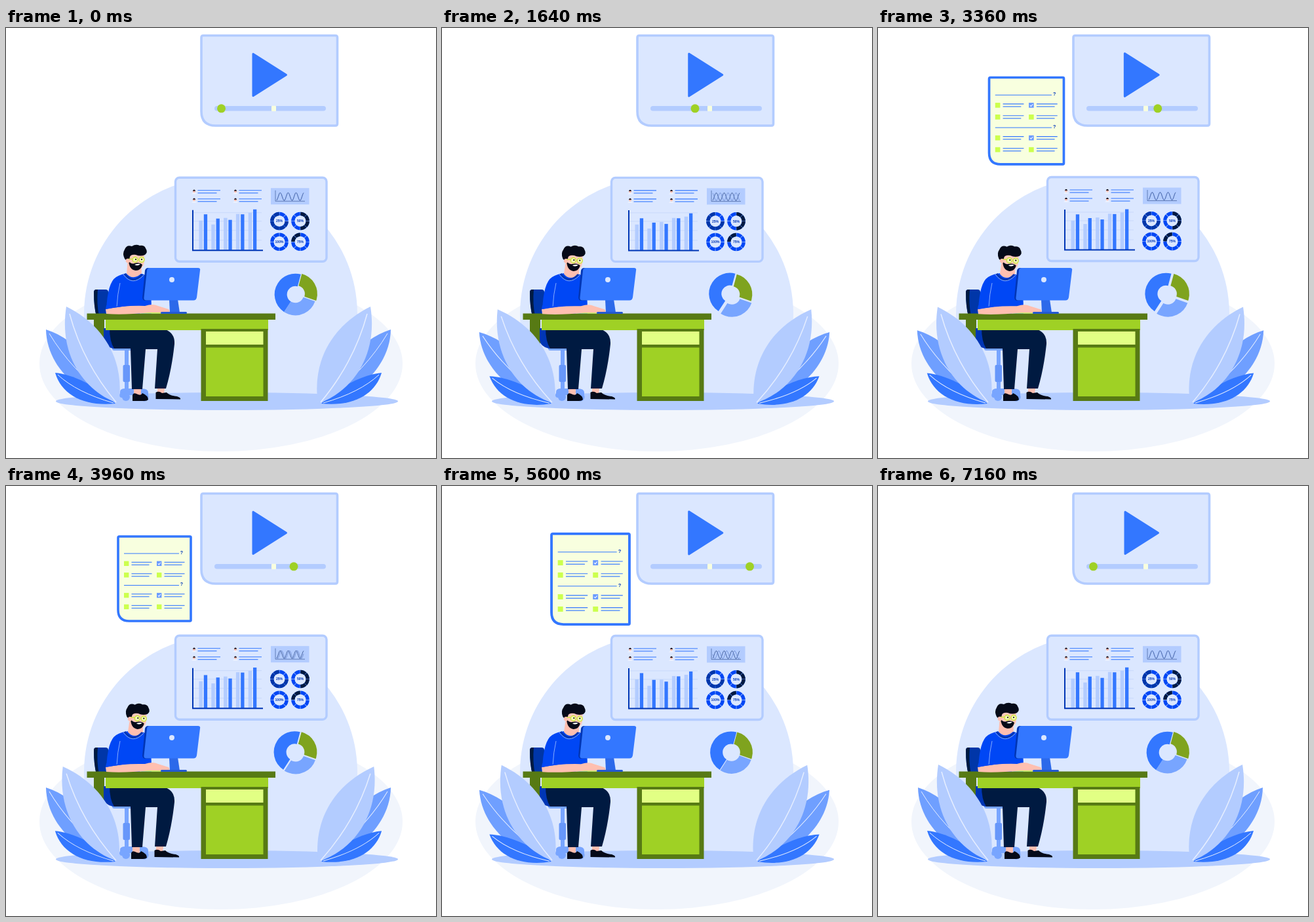
An HTML page that plays this animation: 656 px wide and 656 px high, repeating every 7.2 s.

```html
<!DOCTYPE html>
<html lang="en">
<head>
<meta charset="utf-8">
<title>Working at a desk</title>
<style>
html, body { margin: 0; width: 100%; height: 100%; overflow: hidden; background: #fff; }
svg { display: block; width: 100vw; height: 100vh; }
text { font-family: "Liberation Sans", Inter, sans-serif; font-weight: bold; text-anchor: middle; fill: #0036b5; }
.rib { fill: none; stroke: #e6eeff; }
</style>
</head>
<body>
<svg viewBox="0 0 656 656">
  <defs>
    <g id="plant">
      <g class="side">
        <path d="M165 573C110 560 62 515 61 460C100 472 140 510 165 573Z" fill="#6f9fff"/>
        <path d="M66 466Q98 520 160 568" class="rib"/>
      </g>
      <g class="low">
        <path d="M167 573C120 578 85 560 75 526C100 528 140 546 167 573Z" fill="#3377ff"/>
        <path d="M79 529Q108 556 164 572" class="rib"/>
      </g>
      <g class="big">
        <path d="M172 573C120 555 80 500 92 425C147 452 182 505 172 573Z" fill="#b3ccff"/>
        <path d="M97 436Q117 510 168 571" class="rib" stroke-width="1.5"/>
      </g>
    </g>
  </defs>

  <!-- backdrop -->
  <ellipse cx="328" cy="512" rx="277" ry="134" fill="#f1f5fc"/>
  <path d="M158 565A208.5 208.5 0 1 1 497 565Z" fill="#dbe7ff" transform="translate(0 -7)"/>
  <ellipse cx="337" cy="569.5" rx="261" ry="13.5" fill="#b3ccff"/>

  <!-- video card -->
  <path d="M301 11.5H502.5Q505.5 11.5 505.5 14.5V146Q505.5 149 502.5 149H320Q298 149 298 127V14.5Q298 11.5 301 11.5Z" fill="#dbe7ff" stroke="#b3ccff" stroke-width="3.6"/>
  <path id="play" d="M377 39.5L427.5 71.5L377 103.5Z" fill="#3377ff" stroke="#3377ff" stroke-width="3" stroke-linejoin="round"/>
  <rect x="318" y="119" width="170" height="7.6" rx="3.8" fill="#b3ccff"/>
  <rect x="405" y="118.8" width="7" height="8.2" rx="1" fill="#f8ffdf"/>
  <circle id="knob" cy="122.8" r="6.5" fill="#9fd125"/>

  <!-- quiz sheet -->
  <g id="sheet">
    <path d="M173 77H280.5Q282 77 282 78.5V204.5Q282 206 280.5 206H188Q171 206 171 189V79Q171 77 173 77Z" fill="#f8ffdf" stroke="#3377ff" stroke-width="3.6"/>
    <g id="quiz"></g>
  </g>

  <!-- dashboard -->
  <g id="panel">
    <rect x="258.5" y="228.5" width="230.5" height="128" rx="6" fill="#dbe7ff" stroke="#b3ccff" stroke-width="3.4"/>
    <g id="people"></g>
    <path d="M286 282H390M286 295H390M286 309H390M286 324H390" stroke="#c3d5fa" stroke-width=".8"/>
    <g id="bars"></g>
    <path d="M285 278V339.5H392" fill="none" stroke="#0036b5" stroke-width="2"/>
    <rect x="404" y="244.5" width="58.5" height="25" fill="#b3ccff"/>
    <g fill="none" stroke="#3d5a96" stroke-width=".9">
      <path d="M411 248V264.5H456" stroke-width=".7"/>
      <path id="waveA"/><path id="waveB" stroke="#5f7fc4" stroke-width=".7"/>
    </g>
    <g id="rings"></g>
  </g>

  <!-- pie -->
  <g id="pie" fill="none" stroke-width="19"></g>

  <!-- chair -->
  <path d="M134 403Q134 399 138 399H152Q156 399 156 403V440H138Q134 425 134 403Z" fill="#0036a8"/>
  <path d="M134 403Q134 399 138 399H140Q138 420 142 440H138Q134 425 134 403Z" fill="#001a41"/>
  <rect x="134" y="444" width="16" height="96" fill="#577a14"/>
  <g fill="#78a5ff">
    <rect x="162" y="485" width="42" height="7" rx="3"/>
    <rect x="181" y="490" width="6" height="62"/>
    <rect x="178.5" y="514" width="10.5" height="26" rx="2" fill="#6797fa"/>
    <path d="M174 555Q174 550 182 550H206Q217 550 217 556V560H174Z"/>
    <circle cx="183" cy="563" r="6"/><circle cx="211" cy="563" r="6.5"/><circle cx="177" cy="560" r="4"/>
  </g>

  <!-- lower body -->
  <g id="feet">
    <path d="M195 545H206V561H195ZM231 544H243L241 558H231Z" fill="#ffbfb0"/>
    <path d="M193 569V560Q194 556 199 558Q206 562 208 557Q217 561 217 567Q215 569 211 569Z" fill="#050a18"/>
    <path d="M228.5 566V556Q233 553 238 557L245 556Q250 561 261 562Q267 564 266 566.5Z" fill="#050a18"/>
  </g>
  <path d="M149 458H170V489H163Q150 486 149 476Z" fill="#0036b5"/>
  <path d="M165 489Q158 478 158 458H236Q258 462 257 482Q253 520 244 550H227L231 490H213L208 551H192L190 489Z" fill="#001a41"/>

  <!-- desk -->
  <g fill="#577a14">
    <rect x="152" y="444" width="248" height="17" fill="#9fd125"/>
    <rect x="297.5" y="459" width="102" height="110"/>
    <rect x="305" y="463" width="87.5" height="20" fill="#e2ff84"/>
    <rect x="305" y="487.5" width="87.5" height="74.5" fill="#9fd125"/>
  </g>
  <use href="#plant"/>
  <use href="#plant" transform="matrix(-1 0 0 1 648 0)"/>
  <rect x="123.5" y="435.5" width="287.5" height="9.5" fill="#577a14"/>

  <!-- upper body -->
  <path d="M153 430Q155 388 168 380Q176 375 187 374H203Q216 376 221 386L222 435.5H152Z" fill="#0047f5"/>
  <g id="head">
    <path d="M186 352L184 375Q194 386 207 374L206 356Z" fill="#ffbfb0"/>
    <path d="M185 344Q197 336 211 346L211 358Q210 368 199 368Q185 366 185 344Z" fill="#ffc9bb"/>
    <path d="M187 355Q191 361 196 359Q204 357 208 361Q206 370 198 370Q188 369 187 355Z" fill="#050a18"/>
    <path d="M196 361Q201 364 205 360Q202 359 196 361Z" fill="#fff"/>
    <path d="M181 352Q177 344 181 338Q184 330 192 333Q198 329 204 332Q211 331 213 336Q217 342 212 346Q205 349 198 346Q191 345 189 349Q188 355 186 357Q183 354 181 352Z" fill="#050a18"/>
    <circle cx="186" cy="355" r="3.3" fill="#ffbfb0"/>
    <g fill="#f2f3b4" stroke="#cde53c" stroke-width="1.4">
      <circle cx="197" cy="353.5" r="4"/><circle cx="207" cy="353.5" r="4"/>
      <path d="M187 352.5H193"/>
    </g>
    <circle cx="198" cy="353" r="1"/><circle cx="207" cy="353" r="1"/>
  </g>
  <path d="M181 375Q194 392 208 376" fill="none" stroke="#0036b5" stroke-width="3"/>
  <path d="M179 376Q193 395 210 377M174 389Q170 406 169 426" fill="none" stroke="#a9c4ff" stroke-width=".8"/>
  <rect x="204" y="432.5" width="32" height="3" fill="#cdf65a"/>
  <path id="arm" d="M152 429Q180 423 212 424Q224 420 232 424L248 429Q252 433 246 434H218Q180 438 153 436Z" fill="#ffbfb0"/>
  <path d="M153 423Q165 427 178 423L210 412L222 420Q200 421 152 429Z" fill="#0047f5"/>

  <!-- monitor -->
  <path d="M249 414H262L265 434H250Z" fill="#2c69ea"/>
  <rect x="236" y="433" width="40" height="3" rx="1.5" fill="#2459d0"/>
  <path d="M217 366Q213 366 212 370L208 411Q208 416 213 416H220V366Z" fill="#0036b5"/>
  <path d="M219 366H293Q297 366 296 370L291 411Q290 415.5 286 415.5H214Q210 415.5 210.5 411L215 370Q215.5 366 219 366Z" fill="#3377ff"/>
  <circle cx="253" cy="384" r="4" fill="#dbe7ff"/>
</svg>
<script>
const $ = id => document.getElementById(id);
const LOOP = 7200, REST = 7120;
const BASE = 339;

// swings 0 -> 1 -> 0 over one period
const swing = (t, period) => (1 - Math.cos(2 * Math.PI * t / period)) / 2;
const smooth = p => p * p * (3 - 2 * p);
const clamp = p => Math.max(0, Math.min(1, p));

// value at t between [time, value] keys
function track(keys, t, ease = p => p) {
  let value = keys[0][1];
  for (let i = 1; i < keys.length; i++) {
    const [t0, a] = keys[i - 1], [t1, b] = keys[i];
    if (t >= t0) value = a + (b - a) * ease(clamp((t - t0) / (t1 - t0)));
  }
  return value;
}

const line = (x, y, w, color, width) =>
  `<path d="M${x} ${y}h${w}" stroke="${color}" stroke-width="${width}"/>`;

// ring section: degrees clockwise from the right
const arc = (x, y, r, from, dash, attrs) =>
  `<circle cx="${x}" cy="${y}" r="${r}" pathLength="360" stroke-dasharray="${dash}" transform="rotate(${from} ${x} ${y})" ${attrs}/>`;

function quizRow(y, checked) {
  return [180, 230].map((x, i) => {
    const mark = i && checked;
    return `<rect x="${x}" y="${y - 3.7}" width="7.4" height="7.4" fill="${mark ? '#6a9bff' : '#ccff4d'}"/>` +
      (mark ? `<path d="M${x + 1.8} ${y}l1.5 1.6 2.6-3.2" fill="none" stroke="#fff"/>` : '') +
      line(x + 11.5, y - 2, 31, '#3377ff', 1.1) + line(x + 11.5, y + 2, 27, '#3377ff', 1.1);
  }).join('');
}
$('quiz').innerHTML = [103, 151.5].map((y, i) =>
  line(180, y, 84, '#3377ff', 1) + `<text x="268" y="${y + .8}" font-size="7">?</text>` +
  quizRow(y + 15.3, true) + quizRow(y + 32.8, false)).join('');

$('people').innerHTML = [[287, 250], [350, 250], [287, 263], [350, 263]].map(([x, y]) =>
  `<path d="M${x - 4} ${y + 3.5}q4-4 8 0z" fill="#f4f6fd"/>
   <circle cx="${x}" cy="${y - .5}" r="2" fill="#ffbfb0"/>
   <path d="M${x - 2.2} ${y - 1}q2.2-4.5 4.4 0z" fill="#1c1420"/>` +
  line(x + 5.5, y - 2, 34.5, '#3377ff', 1.1) + line(x + 5.5, y + 2, 29, '#3377ff', 1.1)).join('');

// light height, blue height, period
const bars = [[45, 54.5, 3000], [39, 48, 3400], [49, 46, 3500], [55, 54.5, 3650], [57, 62, 3700]];
$('bars').innerHTML = bars.map((b, i) => {
  const x = 294.5 + i * 18.8;
  return `<rect x="${x}" width="5.5" fill="#b3ccff"/><rect x="${x + 7.3}" width="5.3" fill="#3377ff"/>`;
}).join('');
const barRects = [...$('bars').children];

// label, centre, dark segments, start angle, dark colour
$('rings').innerHTML = [
  ['25%', 417, 294.8, 6, 0, '#0036a8'], ['50%', 449, 294.8, 4, -90, '#001a41'],
  ['100%', 417, 326.6, 0, 0, '#001a41'], ['75%', 449, 326.6, 2, 180, '#001a41']
].map(([label, x, y, dark, from, color]) =>
  arc(x, y, 11.2, 1.5, '42 3', 'fill="none" stroke="#0047f5" stroke-width="5.2"') +
  (dark ? arc(x, y, 11.2, from + 1.5, '42 3 '.repeat(dark) + '0 360', `fill="none" stroke="${color}" stroke-width="5.2"`) : '') +
  `<text x="${x}" y="${y + 1.8}" font-size="5">${label}</text>`).join('');

// start, sweep, colour
const slices = [[-75, 94, '#7fa31e'], [19.5, 103.5, '#78a5ff'], [123, 162, '#3377ff']];
$('pie').innerHTML = slices.map(([from, sweep, color]) =>
  arc(441.5, 406.5, 22.3, from, `${sweep} 360`, `stroke="${color}"`)).join('');
const pieParts = [...$('pie').children].map((c, i) => ({
  c, spin: c.getAttribute('transform'), mid: (slices[i][0] + slices[i][1] / 2) * Math.PI / 180
}));

function wave(shift, end) {
  let d = '';
  for (let x = 413; x <= end; x++)
    d += `${d ? 'L' : 'M'}${x} ${(257.5 - 6 * Math.sin((x - 413 - shift) * .52 - 1.2)).toFixed(1)}`;
  return d;
}

const knobKeys = [[0, 328.5], [1640, 386], [2760, 414.5], [3960, 439], [4920, 459], [6280, 480]];
const sheetKeys = [[1900, 1.1], [2760, 1.05], [4000, 1], [4700, 1], [6300, 1.12]];
const leaves = [['side', -2.4, 4050, 165], ['big', -2.9, 3000, 172], ['low', -3.4, 3700, 167]]
  .map(([name, angle, period, x]) => ({ el: document.querySelector('.' + name), angle, period, x }));
const place = (el, value) => el.setAttribute('transform', value);
const scaleAt = (x, y, s) => `translate(${x} ${y}) scale(${s}) translate(${-x} ${-y})`;

function draw(t) {
  for (const { el, angle, period, x } of leaves)
    place(el, `rotate(${angle * swing(t, period)} ${x} 573)`);

  place($('play'), scaleAt(402, 71.5, 1 + .035 * swing(t, 2000)));
  $('knob').setAttribute('cx', track(knobKeys, t));

  place($('sheet'), scaleAt(226.5, 135, track(sheetKeys, t, smooth)));
  $('sheet').setAttribute('opacity', clamp((t - 1900) / 280));

  place($('panel'), `translate(0 ${.4 - 1.6 * swing(t - 900, 4000)})`);
  bars.forEach(([light, blue, period], i) => {
    const drop = 6 * swing(t, period);
    [light, blue].forEach((h, j) => {
      barRects[2 * i + j].setAttribute('y', BASE - h + drop);
      barRects[2 * i + j].setAttribute('height', h - drop);
    });
  });
  $('waveA').setAttribute('d', wave(0, 454));
  $('waveB').setAttribute('d', wave(6 * swing(t, 3300), 454));

  pieParts.forEach(({ c, spin, mid }, i) => {
    const out = i ? 3.5 * swing(t, 4950) : 1.8 * (1 - swing(t, 3300));
    place(c, `translate(${out * Math.cos(mid)} ${out * Math.sin(mid)}) ${spin}`);
  });

  const lean = smooth(clamp(t / 900));
  place($('head'), `translate(${2 * lean} ${.8 * lean}) rotate(${3.5 * lean} 195 374)`);
  place($('feet'), `translate(${-2 * lean} 0)`);
  place($('arm'), `translate(0 ${.5 * swing(t, 500)})`);
}

function frame(now) {
  const t = now % LOOP;
  draw(t < REST ? t : 0);
  requestAnimationFrame(frame);
}
requestAnimationFrame(frame);
</script>
</body>
</html>
```
